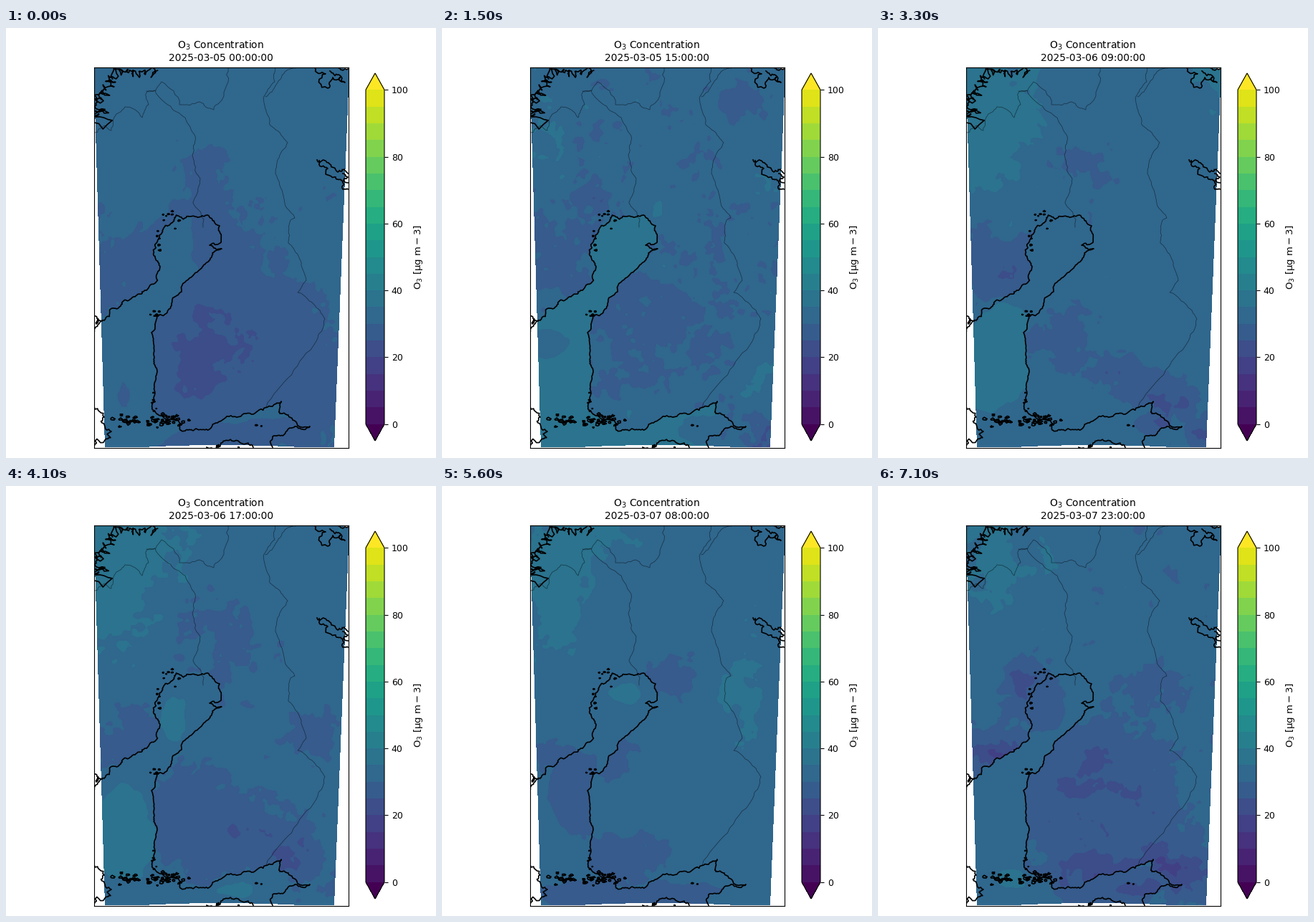
A matplotlib script for the animation above (7.2 s loop, 600x600 px).

```python
import numpy as np
import matplotlib.pyplot as plt
from matplotlib.animation import FuncAnimation
from matplotlib.colors import BoundaryNorm
from matplotlib.path import Path

HOURS = 72
X0, X1, Y0, Y1 = 122.5, 477.5, 54.5, 585.5  # map frame in pixels
W, H = 355, 531
X, Y = np.meshgrid(np.arange(W) + 123.0, np.arange(H) + 55.0)
rng = np.random.default_rng(5)


# ---------- geography ----------
def roughen(points, amount, depth=3):
    """Midpoint displacement of a polyline."""
    p = np.array(points, float)
    for _ in range(depth):
        d = np.diff(p, axis=0)
        normal = np.column_stack([-d[:, 1], d[:, 0]])
        mid = p[:-1] + d / 2 + normal * rng.normal(0, amount, (len(d), 1))
        out = np.empty((2 * len(p) - 1, 2))
        out[::2], out[1::2] = p, mid
        p = out
    return p


def fjords(start, end, count, depth):
    """Zigzag coast between two points, with inlets up to the given depth."""
    a, b = np.array(start, float), np.array(end, float)
    t = np.linspace(0, 1, count)[:, None]
    side = np.array([a[1] - b[1], b[0] - a[0]]) / np.hypot(*(b - a))
    reach = depth * rng.uniform(0.3, 1, (count, 1)) * (np.arange(count) % 2)[:, None]
    jitter = rng.normal(0, 2.5, (count, 2))
    return roughen(a + t * (b - a) + reach * side + jitter, 0.2, 2)


def islets(cx, cy, sx, sy, count, big):
    for _ in range(count):
        a = np.linspace(0, 2 * np.pi, 9)
        r = rng.uniform(0.35, 1) * big * rng.uniform(0.4, 1, 9)
        r[-1] = r[0]
        x, y = rng.normal(cx, sx), rng.normal(cy, sy)
        yield np.column_stack([x + 1.2 * r * np.cos(a), y + 0.8 * r * np.sin(a)])


sweden = roughen([(123, 428), (137, 408), (160, 388), (180, 375), (197, 365), (215, 333),
                  (206, 317), (214, 289), (228, 275), (238, 261), (258, 263), (283, 262)], 0.15, 4)
finland = roughen([(283, 262), (298, 276), (299, 300), (284, 303), (290, 307), (301, 308),
                   (288, 314), (273, 335), (245, 368), (226, 394), (210, 401), (203, 425),
                   (207, 460), (211, 480), (207, 500), (204, 530)], 0.1, 4)
gulf = roughen([(204, 530), (216, 541), (240, 547), (243, 561), (265, 559), (295, 551),
                (335, 538), (372, 528), (384, 521), (382, 538), (400, 547), (424, 556),
                (396, 558), (372, 570), (372, 585)], 0.13, 4)
main_coast = np.vstack([sweden, finland, gulf])

coasts = [
    main_coast,
    roughen([(280, 585), (300, 579), (315, 576), (338, 579), (345, 585)], 0.2),
    roughen([(123, 529), (137, 543), (134, 551), (147, 563), (138, 575), (123, 584)], 0.2),
    roughen([(123, 402), (129, 406), (126, 413), (134, 409)], 0.2),
    fjords((207, 58), (150, 57), 18, -14),
    fjords((150, 57), (124, 96), 12, -13),
    fjords((124, 90), (123, 131), 15, -22),
    roughen([(431, 55), (446, 64), (449, 84), (456, 69), (473, 76), (464, 65), (452, 60)], 0.25),
    roughen([(463, 55), (470, 59), (477, 57)], 0.2),
    roughen([(434, 184), (450, 188), (463, 201), (472, 197), (477, 203)], 0.2),
    roughen([(437, 185), (449, 196), (458, 208), (468, 213), (470, 225), (477, 225)], 0.25),
    roughen([(470, 203), (477, 208), (471, 212), (477, 216)], 0.2),
]
for group in [(171, 548, 8, 6, 16, 4), (196, 549, 8, 5, 7, 2.5), (225, 548, 11, 5, 28, 3.5),
              (209, 398, 5, 4, 7, 2.5), (232, 269, 6, 6, 8, 2.5), (213, 297, 2, 9, 5, 2),
              (207, 520, 2, 10, 6, 2), (354, 556, 9, 1, 2, 1.5), (300, 583, 9, 1, 4, 2)]:
    coasts.extend(islets(*group))

borders = [
    roughen([(123, 147), (138, 136), (147, 143), (154, 120), (166, 110), (190, 125),
             (199, 107), (195, 92), (217, 75), (242, 107), (270, 103), (290, 114),
             (304, 95), (310, 55)], 0.08),
    roughen([(196, 88), (208, 87), (232, 113), (250, 125), (264, 151), (260, 177),
             (271, 210), (263, 238), (275, 278)], 0.08),
    roughen([(375, 55), (375, 75), (359, 98), (368, 135), (393, 160), (376, 203),
             (403, 265), (397, 268), (394, 300), (408, 318), (419, 352), (407, 369),
             (445, 406), (433, 437), (363, 530)], 0.05, 4),
    roughen([(407, 55), (392, 59), (377, 79), (362, 96)], 0.08),
]

outline = np.vstack([main_coast, [(372, 620), (80, 620), (80, 428)]])
sea = Path(outline).contains_points(np.column_stack([X.ravel(), Y.ravel()])).reshape(H, W)
domain = ((X > 122 + 0.0295 * (Y - 60)) & (X < 477.5 - 0.04 * (Y - 60))
          & (Y > 53 + 4 * ((X - 270) / 200) ** 2)
          & (Y < 582.5 + 2.5 * ((X - 300) / 100) ** 2))


# ---------- ozone field ----------
def cloud(seed, slope=1.7, cutoff=0.11):
    """Smooth fractal noise with unit deviation."""
    k = np.hypot(np.fft.fftfreq(H)[:, None], np.fft.fftfreq(W)[None, :])
    k[0, 0] = 1
    gain = np.maximum(k, 0.012) ** -slope * np.exp(-(k / cutoff) ** 2)
    gain[0, 0] = 0
    white = np.random.default_rng(seed).standard_normal((H, W))
    n = np.fft.ifft2(np.fft.fft2(white) * gain).real
    return n / n.std()


def blobs(items, xs, ys):
    """Sum of bumps given as x, y, radius x, radius y, amount."""
    return sum(a * np.exp(-((xs - x) / rx) ** 2 - ((ys - y) / ry) ** 2)
               for x, y, rx, ry, a in items)


fields = {}


def add_field(hour, land_level, sea_level, rough, on_land, on_sea):
    seed = 10 * len(fields)
    dx, dy = cloud(seed + 1, 1.3), cloud(seed + 2, 1.3)
    land = land_level + blobs(on_land, X + 7 * dx, Y + 7 * dy) + rough * cloud(seed + 3, 1.15)
    water = sea_level + blobs(on_sea, X + 2 * dx, Y + 2 * dy) + 0.25 * cloud(seed + 4, 2)
    fields[hour] = np.where(sea, water, land)


add_field(0, 32.4, 32.2, 0.6,
          [(310, 430, 120, 140, -5.6), (275, 225, 45, 60, -3.8), (262, 470, 55, 105, -4),
           (165, 330, 60, 60, -4.5), (430, 520, 90, 120, -3.6), (453, 235, 9, 17, -3.5)],
          [(285, 300, 35, 60, -4), (163, 515, 10, 24, -3.4), (340, 575, 160, 40, -4)])
add_field(15, 32, 36.8, 1.25,
          [(290, 400, 110, 110, -3), (165, 310, 60, 80, -4.3), (212, 233, 22, 14, -5),
           (415, 108, 40, 30, -3.4), (155, 160, 22, 75, 4.4), (440, 490, 24, 26, 4.8),
           (440, 570, 18, 15, -9)],
          [(150, 440, 22, 18, -5.5), (380, 560, 55, 20, -4.5)])
add_field(25, 32, 33.5, 1.2,
          [(200, 75, 95, 38, 4.8), (160, 145, 42, 48, 7), (220, 425, 30, 18, -8),
           (310, 517, 95, 20, -8), (165, 370, 45, 20, -6), (310, 225, 65, 75, -2.2),
           (385, 430, 35, 55, 4.2), (440, 535, 22, 50, 3)],
          [(250, 325, 42, 30, 3.6), (170, 488, 50, 20, 3.5), (175, 415, 50, 20, -4)])
add_field(33, 32.5, 32.8, 0.7,
          [(145, 130, 100, 120, 5.4), (467, 80, 18, 60, 4.2), (280, 185, 50, 60, -4.6),
           (175, 335, 55, 46, -8), (260, 430, 55, 45, -4.4), (345, 485, 45, 28, -7),
           (405, 525, 40, 26, -9), (445, 572, 22, 24, -8)],
          [(165, 460, 60, 85, 4.4), (400, 552, 35, 16, -9)])
add_field(47, 32, 33.5, 1.2,
          [(200, 80, 135, 55, 5), (148, 190, 52, 90, 4.6), (315, 220, 70, 82, -4.5),
           (275, 480, 100, 72, -8.5), (425, 350, 45, 55, -6), (395, 510, 60, 45, -6.5),
           (440, 500, 24, 30, 5), (165, 372, 45, 20, -8.5)],
          [(235, 320, 35, 45, 4), (160, 500, 55, 50, 3.6), (310, 565, 110, 22, 3)])
add_field(56, 32.4, 32.3, 0.65,
          [(160, 130, 65, 115, 4.6), (235, 70, 70, 18, 3.2), (420, 290, 26, 95, 3.8),
           (315, 270, 38, 34, -4.6), (240, 385, 40, 32, -4.6), (255, 520, 65, 38, -6),
           (150, 375, 45, 25, -4)],
          [(255, 288, 40, 24, 3.8), (190, 430, 45, 80, -4.5), (270, 575, 170, 30, -4.4)])
add_field(71, 32, 31.8, 1,
          [(155, 105, 55, 110, 4.9), (230, 110, 14, 50, 4), (300, 430, 125, 110, -7),
           (290, 540, 90, 20, -7), (410, 530, 55, 35, -11), (205, 275, 25, 35, -9),
           (160, 375, 60, 26, -9), (385, 280, 80, 26, -3.4)],
          [(225, 300, 40, 45, -4.2), (180, 550, 40, 30, 4.4), (370, 565, 100, 28, -8)])


def ozone(hour):
    hours = list(fields)
    i = min(np.searchsorted(hours, hour, side="right") - 1, len(hours) - 2)
    a, b = hours[i], hours[i + 1]
    w = (hour - a) / (b - a)
    return np.ma.masked_where(~domain, (1 - w) * fields[a] + w * fields[b])


# ---------- figure ----------
def box(left, top, right, bottom):
    return [left / 600, 1 - bottom / 600, (right - left) / 600, (bottom - top) / 600]


plt.rcParams["font.family"] = "DejaVu Sans"
fig = plt.figure(figsize=(6, 6), dpi=100, facecolor="white")
ax = fig.add_axes(box(X0, Y0, X1, Y1))
levels = np.arange(0, 101, 5)
cmap = plt.get_cmap("viridis", len(levels) + 1)
norm = BoundaryNorm(levels, cmap.N, extend="both")
image = ax.imshow(ozone(0), cmap=cmap, norm=norm, extent=(X0, X1, Y1, Y0),
                  interpolation="nearest", aspect="auto")
for line in borders:
    ax.plot(*line.T, color="black", lw=0.5, alpha=0.55)
for line in coasts:
    ax.plot(*line.T, color="black", lw=1.2)
ax.set(xlim=(X0, X1), ylim=(Y1, Y0), xticks=[], yticks=[])
title = ax.set_title("", fontsize=10)

cax = fig.add_axes(box(502, 63, 528, 576))
bar = fig.colorbar(image, cax=cax, ticks=range(0, 101, 20))
bar.minorticks_off()
bar.ax.tick_params(labelsize=9)
bar.set_label(r"O$_3$ [$\mathrm{\mu g\ m-3}$]", fontsize=9.5)


def draw(hour):
    image.set_data(ozone(hour))
    title.set_text(f"O$_3$ Concentration\n2025-03-{5 + hour // 24:02d} {hour % 24:02d}:00:00")
    return image, title


anim = FuncAnimation(fig, draw, frames=HOURS, interval=100, repeat=True, repeat_delay=0)
plt.show()
```
